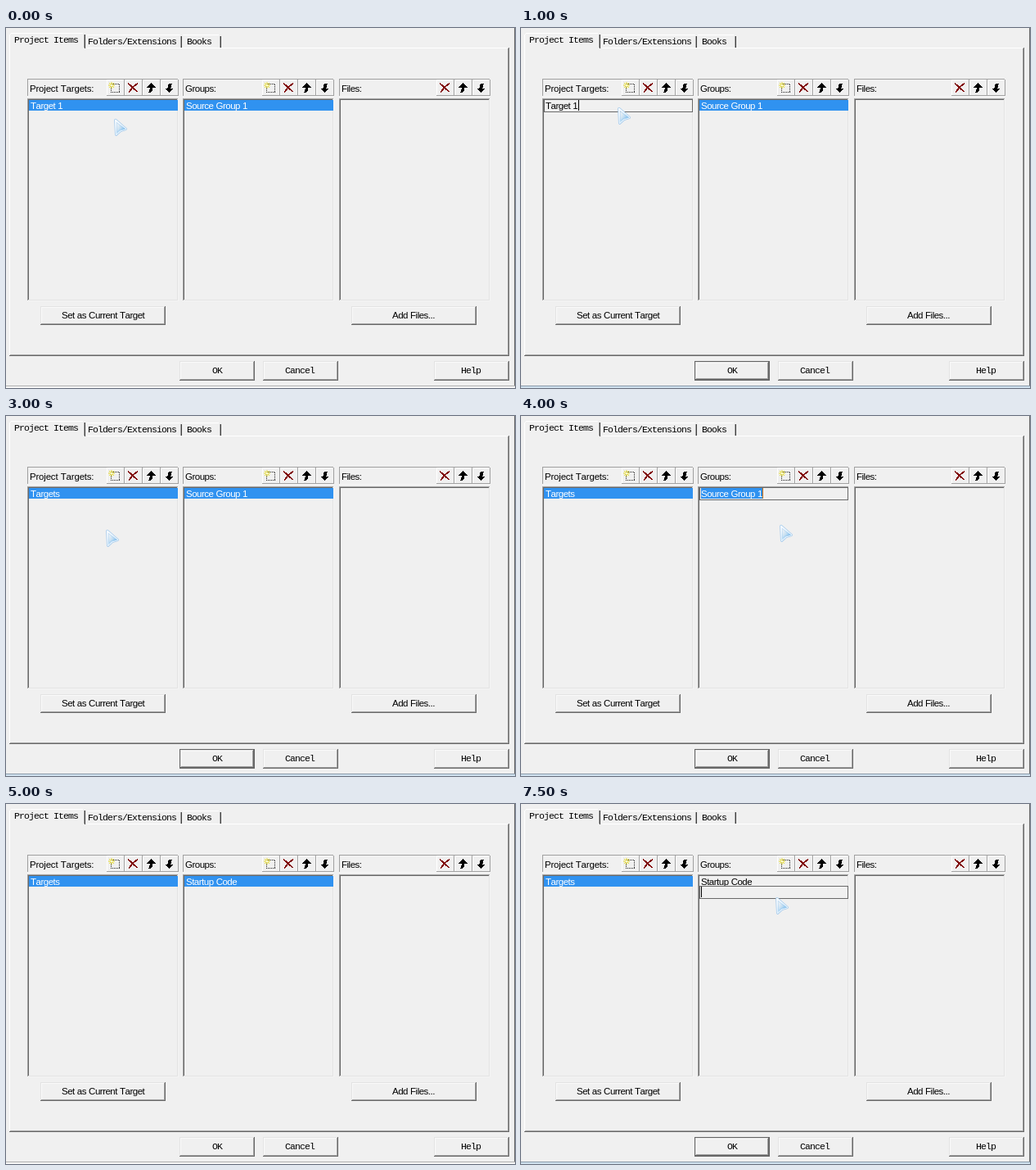
These frames come from a looping animation (622 by 440 pixels, 8000 ms). An HTML page:

```html
<!DOCTYPE html>
<html lang="en">
<head>
<meta charset="utf-8">
<title>Project items dialog</title>
<style>
html, body { margin: 0; width: 100%; height: 100%; overflow: hidden; background: #f0f0f0; }
svg { display: block; }
text { font: 11.5px "Liberation Sans", Arial, sans-serif; letter-spacing: -.5px; word-spacing: .4px; font-kerning: none; white-space: pre; }
.mono { font: 11.5px "Liberation Mono", monospace; letter-spacing: -.9px; word-spacing: 0; }
.loose { letter-spacing: -.2px; }
.line { fill: none; }
.line, rect, #cut, #up, #down { shape-rendering: crispEdges; }
</style>
</head>
<body>
<svg id="stage" width="622" height="440" viewBox="0 0 622 440">
  <defs>
    <linearGradient id="glass" x1="0" y1="0" x2="1" y2="1">
      <stop offset=".1" stop-color="#fff" stop-opacity=".3"/>
      <stop offset=".75" stop-color="#7cbcec" stop-opacity=".85"/>
    </linearGradient>
    <g id="add">
      <rect x="-4.5" y="-4.5" width="10" height="10" fill="none" stroke="#222" stroke-dasharray="1 1"/>
      <path d="M-4-7V1M-8-3H0M-7-6L-1 0M-1-6L-7 0" stroke="#e8dc28"/>
      <rect x="-5" y="-4" width="2" height="2" fill="#fffbd0"/>
    </g>
    <path id="cut" d="M-6-5.5C-3-3 2 2 5.500 5M6-5.500C1-2 -2 1 -5 5.500" fill="none" stroke="#800000" stroke-width="1.7"/>
    <path id="up" d="M.5-6.500L6-.5H2.500C2.500 2 2 4 .5 5.500H-3C-1.500 3.500-1.300 2-1.300-.5H-5Z"/>
    <path id="down" d="M.5 6.500L6 .5H2.500C2.500-2 3-4 4-5.500H.5C-1-4-1.500-2-1.500 .5H-5Z"/>
    <path id="arrow" d="M1.800 2.500L14.300 13.500L7.800 15.500L2.600 20.200Z" stroke-linejoin="round"/>
    <g id="pointer">
      <use href="#arrow" fill="none" stroke="#a2c8ea" stroke-width="3.200"/>
      <use href="#arrow" fill="none" stroke="#f4faff" stroke-width="1.700"/>
      <use href="#arrow" fill="url(#glass)"/>
    </g>
  </defs>
  <g id="dialog"></g>
  <g id="live"></g>
</svg>
<script>
const $ = id => document.getElementById(id);
const FACE = '#f0f0f0', BLUE = '#3092f0', GRAY = '#a0a0a0', DARK = '#696969', PALE = '#e3e3e3';

const rect = (x, y, w, h, fill) => `<rect x="${x}" y="${y}" width="${w}" height="${h}" fill="${fill}"/>`;
const line = (d, color) => `<path class="line" d="${d}" stroke="${color}"/>`;
const text = (x, y, s, fill = '#000', cls = '') => `<text x="${x}" y="${y}" fill="${fill}" class="${cls}">${s}</text>`;
const mono = (x, y, s) => text(x, y, s, '#000', 'mono');
const icon = (id, x, y) => `<use href="#${id}" x="${x}" y="${y}"/>`;

// One-pixel bevel: top-left, then bottom-right
const edge = (x, y, w, h, tl, br) =>
  line(`M${x + .5} ${y + h - 1}V${y + .5}H${x + w - 1}`, tl) +
  line(`M${x} ${y + h - .5}H${x + w - .5}V${y}`, br);

const raised = (x, y, w, h) => rect(x, y, w, h, FACE) +
  edge(x, y, w, h, PALE, DARK) + edge(x + 1, y + 1, w - 2, h - 2, '#fafafa', GRAY);

function column(dx, label, icons, cls) {
  const x = 26 + dx;
  let out = edge(x, 62, 185, 22, GRAY, '#f8f8f8') + text(x + 3, 78, label, '#000', cls);
  icons.forEach((id, i) => {
    const right = x + 185 - 22 * (icons.length - 1 - i);
    out += edge(right - 22, 63, 22, 20, '#fff', GRAY) + icon(id, right - 12, 73);
  });
  return out + edge(x, 86, 185, 248, GRAY, '#f4f4f4') + edge(x + 1, 87, 183, 246, DARK, PALE);
}

function dialog() {
  const tools = ['add', 'cut', 'up', 'down'];
  return line('M4.5 400V8.5L6.5 6.5H94', '#fff') +
    line('M95.5 8V24', GRAY) + line('M96.5 8V25', '#404040') +
    line('M97 24.5H614', '#fff') +
    line('M98 8.500H213M216 8.500H260', '#fff') +
    line('M213.5 10V24M261.500 10V24', GRAY) + line('M214.5 10V24M262.500 10V24', '#404040') +
    line('M5 399.5H613.5V25', GRAY) + line('M4 400.5H614.5V24', DARK) +
    mono(10, 18, 'Project Items') + mono(100, 20, 'Folders/Extensions') + mono(221, 20, 'Books') +
    column(0, 'Project Targets:', tools, 'loose') +
    column(190, 'Groups:', tools) +
    column(381, 'Files:', tools.slice(1)) +
    raised(42, 340, 153, 23) + text(68, 355, 'Set as Current Target') +
    raised(422, 340, 153, 23) + text(472, 355, 'Add Files...') +
    raised(314, 407, 92, 24) + mono(341, 422, 'Cancel') +
    raised(523, 407, 92, 24) + mono(556, 422, 'Help') +
    line('M621.5 0V438', '#707070');
}

function okButton(active) {
  const face = active
    ? rect(212, 407, 92, 24, '#646464') + raised(213, 408, 90, 22)
    : raised(212, 407, 92, 24);
  const frame = active
    ? rect(0, 437, 622, 1, '#8c9caa') + rect(0, 438, 622, 2, '#cfe0ee')
    : rect(0, 437, 622, 1, '#b0b0b0') + rect(0, 438, 622, 2, '#f6f6f6');
  return face + mono(252, 422, 'OK') + frame;
}

const row = (x, s, on = true) =>
  (on ? rect(x, 88, 182, 13, BLUE) : '') + text(x + 2, 99, s, on ? '#fff' : '#000');

// The caret inverts what lies under it, so it is orange on a selection
function edit(x, y, s, caret, marked = false) {
  return rect(x, y - 1, 182, 16, DARK) + rect(x + 1, y, 180, 14, FACE) +
    (marked ? rect(x + 2, y, caret - x - 2, 13, BLUE) : '') +
    text(x + 2, y + 11, s, marked ? '#fff' : '#000') +
    (caret ? rect(caret, y, 1, 13, marked ? '#cf6d0f' : '#000') : '');
}

const L = 28, G = 218;
const target1 = row(L, 'Target 1'), targets = row(L, 'Targets');
const group1 = row(G, 'Source Group 1'), startup = row(G, 'Startup Code');
const newGroup = row(G, 'Startup Code', false) + edit(G, 101, '', 220);

// time, dialog active, target list, group list, pointer
const steps = [
  [0, false, target1, group1, [132, 110]],
  [500, true, target1, group1, [118, 96]],
  [1000, true, edit(L, 88, 'Target 1', 70), group1, [118, 96]],
  [1500, true, edit(L, 88, 'Target 1'), group1, [118, 96]],
  [2000, true, edit(L, 88, 'Target', 61), group1, [118, 96]],
  [2500, true, edit(L, 88, 'Targets', 66), group1, [118, 96]],
  [3000, true, targets, group1, [122, 138]],
  [3500, true, targets, group1, [252, 100]],
  [4000, true, targets, edit(G, 88, 'Source Group 1', 295, true), [316, 132]],
  [4500, true, targets, startup, [316, 132]],
  [5000, false, targets, startup, null],
  [6500, false, targets, startup, [348, 84]],
  [7000, true, targets, newGroup, [323, 77]],
  [7500, true, targets, newGroup, [311, 113]]
];
const LOOP = 8000, start = performance.now();
let shown = null;

function tick() {
  const t = (performance.now() - start) % LOOP;
  const step = steps.filter(s => s[0] <= t).pop();
  if (step !== shown) {
    shown = step;
    const [, active, left, right, at] = step;
    $('live').innerHTML = okButton(active) + left + right + (at ? icon('pointer', ...at) : '');
  }
  requestAnimationFrame(tick);
}

$('dialog').innerHTML = dialog();
tick();
</script>
</body>
</html>
```
